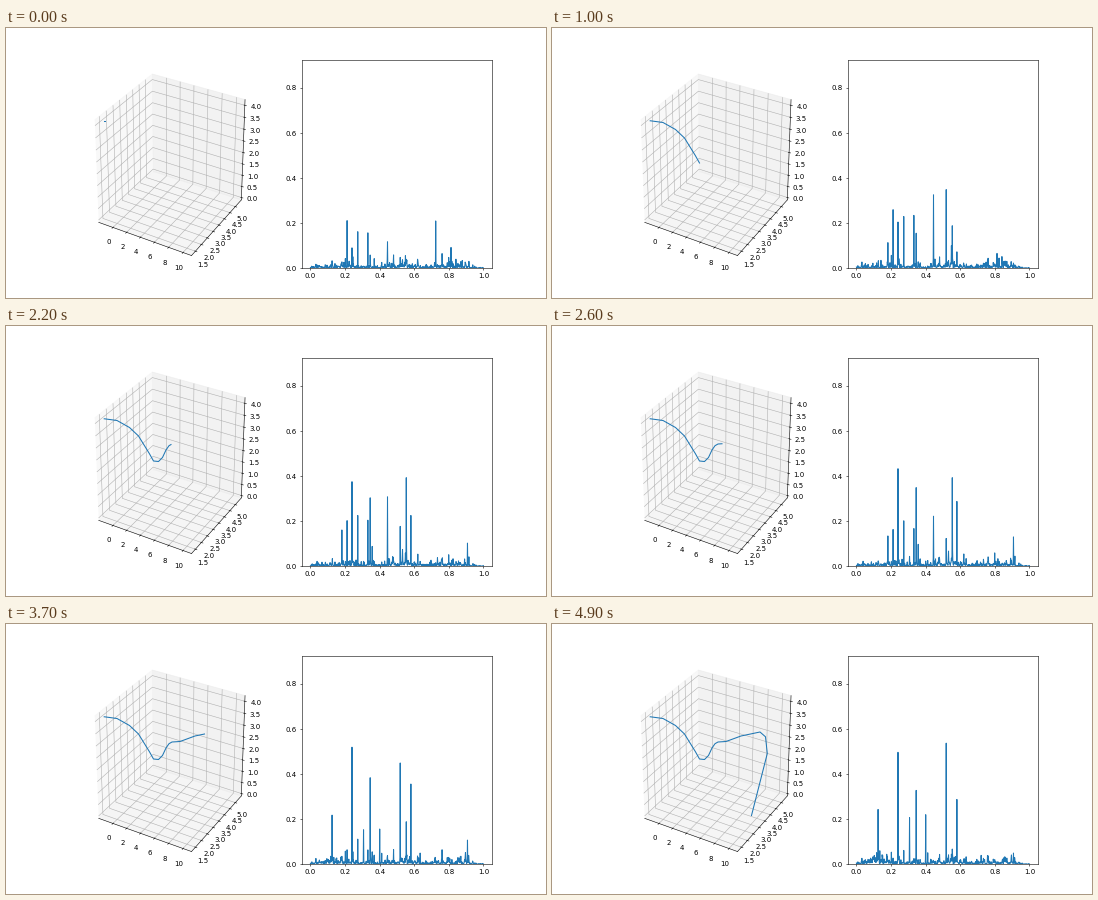
Animation of 540 by 270 pixels, one loop 5 s. Source, as a matplotlib script:

```python
import numpy as np
import matplotlib.pyplot as plt
from matplotlib.animation import FuncAnimation
from matplotlib.lines import Line2D

WIDTH, HEIGHT, DPI = 540, 270, 50
FRAMES, INTERVAL = 50, 100
PAUSE_FRAME, LAST_STEP = 15, 43
BLUE = "#1f77b4"

# Key points of the projected trajectory: step, x, y in stage pixels.
TRAIL = np.array([
    (0, 98.5, 92.8), (1, 111, 94.5), (3, 123.5, 101.5), (5, 132.5, 110),
    (8, 143.3, 127.5), (10, 147.5, 135), (12, 152.5, 135.5), (14, 156.5, 131.5),
    (16, 160, 124), (19, 163, 119.7), (22, 166, 118), (28, 174, 117.5),
    (34, 189, 112), (38, 208, 108), (39, 213.5, 112.8), (40, 215.3, 129.5),
    (43, 199.5, 191.5),
])

# Strong spectral lines swell and fade: position, height, peak step, duration.
LINES = (
    (.125, .28, 40, 8), (.212, .26, 10, 22), (.241, .52, 37, 28),
    (.274, .24, 15, 24), (.308, .21, 45, 16), (.333, .24, 13, 20),
    (.346, .39, 33, 24), (.400, .22, 43, 12), (.445, .37, 15, 14),
    (.520, .39, 13, 9), (.520, .54, 42, 14), (.554, .40, 23, 15),
    (.581, .36, 34, 19), (.725, .21, 0, 6),
)

COUNT, WEAK = 600, 50
grid = np.linspace(0, 1, COUNT)
rng = np.random.default_rng(4)

weak_lines = list(zip(rng.uniform(.02, .93, WEAK), rng.exponential(.04, WEAK),
                      rng.uniform(-8, 45, WEAK), np.full(WEAK, 14)))


def bump(value, center, width):
    return np.exp(-((value - center) / width) ** 2)


# The floor stays low, with sparse taller spikes, and shimmers slowly.
floor = np.convolve(rng.lognormal(0, .9, COUNT), (.15, .7, .15), "same")
floor *= .0045 + .006 * bump(grid, .52, .07) + .003 * bump(grid, .83, .07)
floor *= np.clip((1 - grid) / .1, .25, 1)
phase = rng.uniform(0, 2 * np.pi, COUNT)
surge = rng.exponential(.05, COUNT) * bump(grid, .12, .045)


def spectrum(step):
    values = floor * (1 + .5 * np.sin(phase + .2 * step))
    values += surge * bump(step, 40, 3)
    for position, height, peak, duration in (*LINES, *weak_lines):
        i = round(position * (COUNT - 1))
        height = height * bump(step, peak, duration)
        values[i] = max(values[i], height)
        values[[i - 1, i + 1]] += .06 * height
    return values


def trail(step):
    steps = np.arange(step + 1)
    x, y = (np.interp(steps, TRAIL[:, 0], TRAIL[:, k]) for k in (1, 2))
    # A short lead-in keeps the starting point visible as a dot.
    x, y = np.r_[x[0] - .3, x], np.r_[y[0], y]
    return x / WIDTH, 1 - y / HEIGHT


def step_of(frame):
    """Step on show: one frame is held, and the run ends before the loop."""
    return min(frame - (frame >= PAUSE_FRAME), LAST_STEP)


def set_padded(setter, low, high):
    pad = (high - low) / 48
    setter(low - pad, high + pad)


fig = plt.figure(figsize=(WIDTH / DPI, HEIGHT / DPI), dpi=DPI, facecolor="white")

space = fig.add_subplot(1, 2, 1, projection="3d")
space.view_init(30, -60)
# A unit cube that fills the whole subplot rather than a centred square.
space.set_box_aspect((1, 1, 1), zoom=np.sqrt(3) / 1.8294640721620434)
space.apply_aspect = lambda position=None: None
space.set_xticks(np.arange(0, 11, 2))
space.set_yticks(np.arange(1.5, 5.1, .5))
space.set_zticks(np.arange(0, 4.1, .5))
set_padded(space.set_xlim, -1.85, 10.9)
set_padded(space.set_ylim, 1.27, 5.48)
set_padded(space.set_zlim, -.02, 4.15)

plot = fig.add_subplot(1, 2, 2)
plot.set_xlim(-.05, 1.05)
plot.set_ylim(0, .922)
plot.set_xticks(np.arange(0, 1.1, .2))
plot.set_yticks(np.arange(0, .9, .2))
spectrum_line, = plot.plot(grid, spectrum(0), color=BLUE, lw=1.5)

trail_line = Line2D([], [], color=BLUE, lw=1.5, transform=fig.transFigure)
fig.add_artist(trail_line)


def update(frame):
    step = step_of(frame)
    spectrum_line.set_ydata(spectrum(step))
    trail_line.set_data(*trail(step))
    return spectrum_line, trail_line


animation = FuncAnimation(fig, update, frames=FRAMES, interval=INTERVAL,
                          repeat=True, repeat_delay=0, blit=False)
plt.show()
```
